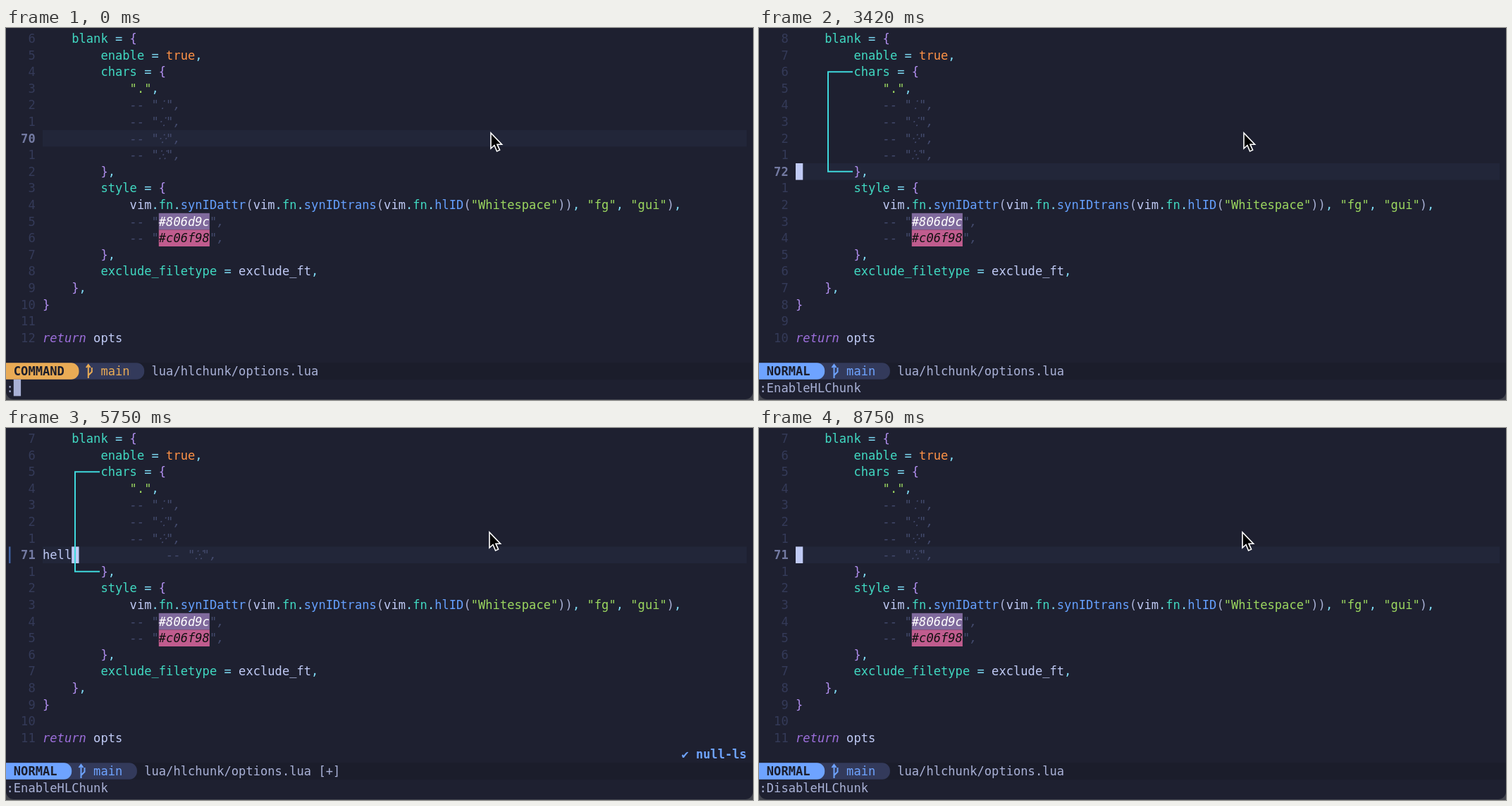
These frames come from a looping animation (1060 px wide and 528 px high, 8790 ms). An HTML page with a canvas:

```html
<!DOCTYPE html>
<html lang="en">
<head>
<meta charset="utf-8">
<title>Editor session</title>
<style>
  html, body { margin: 0; overflow: hidden; background: #1e2030; }
  canvas { display: block; }
</style>
</head>
<body>
<canvas id="stage" width="1060" height="528"></canvas>
<script>
const ctx = document.getElementById('stage').getContext('2d');
const LOOP = 8790, CELL = 10.3, LINE = 23.6, GUTTER = 5;
const FONT = '17.1px "DejaVu Sans Mono", "Noto Sans Mono", "Noto Sans CJK SC", "Noto Sans CJK", monospace';
const C = {
  bg: '#1e2030', line: '#222639', bar: '#1b1d2b', branch: '#333a5b', text: '#c0caf5', soft: '#a9b1d6',
  number: '#343a58', current: '#737aa2', comment: '#434a6d', key: '#41d9c2', punct: '#7fdcf5',
  brace: '#b28ff0', string: '#9bd65f', bool: '#ff9246', func: '#65a0ff', keyword: '#9d6fdc',
  chunk: '#3fd8dc', border: '#29a4bd', match: '#10bcd8', kind: '#b694f6', select: '#343a58'
};
const MODES = { NORMAL: '#6ea3ff', INSERT: '#8fd04f', COMMAND: '#e9ab55' };

const code = `    blank = {
        enable = true,
        chars = {
            ".",
            -- "⁚",
            -- "⁖",
            -- "⁘",
            -- "⁙",
        },
        style = {
            vim.fn.synIDattr(vim.fn.synIDtrans(vim.fn.hlID("Whitespace")), "fg", "gui"),
            -- "#806d9c",
            -- "#c06f98",
        },
        exclude_filetype = exclude_ft,
    },
}

return opts`.split('\n');

const rules = [
  [/^--.*/, C.comment, 'italic'], [/^"[^"]*"/, C.string], [/^true/, C.bool], [/^return/, C.keyword, 'italic'],
  [/^\w+(?= =)/, C.key], [/^fn(?=\.)/, C.key], [/^\w+(?=\()/, C.func], [/^\w+/, C.text],
  [/^[{}]/, C.brace], [/^[()]/, C.soft], [/^[=,.]/, C.punct], [/^\s+/, C.text]
];

const targets = ['HL', 'HLIndent', 'HLChunk', 'HLBlank', 'HLLineNum'];
const commands = [
  ...targets.map(s => 'Enable' + s),
  ...'earlier echo echoerr echohl echomsg echon edit else elseif emenu endif enew ex'.split(' '),
  ...targets.map(s => 'Disable' + s),
  ...'delete delmarks diffthis display doautocmd'.split(' ')
];

// Indices of the letters of a fuzzy match, or null
function fuzzy(word, query) {
  const hits = [];
  let from = 0;
  for (const ch of query) {
    const at = word.toLowerCase().indexOf(ch, from);
    if (at < 0 || (!hits.length && at)) return null;
    hits.push(at);
    from = at + 1;
  }
  return hits;
}

// Timeline of [time, state patch]
const events = [[-200, {
  mode: 'COMMAND', row: 6, col: 18, cmd: ':', query: '', pick: -1, chunk: false,
  typed: '', dirty: false, lsp: false, mouse: [688, 149]
}]];
const at = (time, patch) => events.push([time, patch]);

function runCommand(start, step, query, prefix, enter, chunk) {
  for (let i = 1; i <= query.length; i++) {
    const time = start + (i - 1) * step, part = query.slice(0, i);
    at(time, { cmd: ':' + part });
    at(time + 80, { query: part });
  }
  for (let i = 0; i < 3; i++) at(enter - 430 + i * 120, { pick: i, cmd: ':' + prefix + targets[i] });
  at(enter, { mode: 'NORMAL', query: '', pick: -1, chunk });
}

runCommand(180, 110, 'enablhl', 'Enable', 1550, true);
at(2100, { row: 7 });
at(2900, { row: 8, col: 9 });
at(3150, { col: 0 });
at(3800, { row: 7 });
at(4150, { mode: 'INSERT', mouse: [686, 148] });
[...'hello'].forEach((_, i) => at(4330 + i * 160, {
  typed: 'hello'.slice(0, i + 1), col: i + 1, dirty: true, lsp: true
}));
at(5500, { mode: 'NORMAL', col: 4 });
at(5850, { row: 8 });
at(6150, { row: 7 });
at(6620, { typed: '', dirty: false, col: 0, cmd: '1 行发生改变; before #279  3 秒前' });
at(7250, { mode: 'COMMAND', cmd: ':', lsp: false });
runCommand(7370, 85, 'disablhl', 'Disable', 8500, false);
events.sort((a, b) => a[0] - b[0]);

const X = col => 0.5 + col * CELL;
const Y = row => 15 + row * LINE;

function box(col, row, cells, color) {
  ctx.fillStyle = color;
  ctx.fillRect(X(col), Y(row) - LINE / 2, cells * CELL, LINE);
}

// Writes text on the character grid
function put(text, col, row, color, style = '') {
  ctx.font = style + ' ' + FONT;
  ctx.fillStyle = color;
  for (const ch of text) {
    ctx.fillText(ch, X(col), Y(row) + 6);
    col += ch > '\u2e80' ? 2 : 1;
  }
}

function putCode(text, row) {
  let col = GUTTER;
  while (text) {
    const [re, color, style] = rules.find(r => r[0].test(text));
    const token = text.match(re)[0];
    put(token, col, row, color, style);
    const hex = token.match(/#\w{6}/);
    if (hex) {
      const light = hex[0] === '#806d9c', left = col + hex.index;
      box(left, row, 7, light ? '#806a9d' : '#c05c8e');
      put(hex[0], left, row, light ? '#fff' : '#111', 'italic');
    }
    col += token.length;
    text = text.slice(token.length);
  }
}

function drawChunk() {
  ctx.strokeStyle = C.chunk;
  ctx.lineWidth = 2;
  ctx.beginPath();
  ctx.moveTo(133, Y(2));
  ctx.lineTo(98, Y(2));
  ctx.lineTo(98, Y(8));
  ctx.lineTo(133, Y(8));
  ctx.stroke();
}

function pill(cells, color) {
  ctx.fillStyle = color;
  ctx.beginPath();
  ctx.roundRect(0, Y(20) - LINE / 2, X(cells), LINE, [0, 11, 11, 0]);
  ctx.fill();
}

function drawStatus(s) {
  const color = MODES[s.mode], n = s.mode.length;
  ctx.fillStyle = C.bar;
  ctx.fillRect(0, Y(20) - LINE / 2, 1060, LINE);
  pill(n + 12, C.branch);
  pill(n + 3, color);
  put(s.mode, 1, 20, '#1b1d2b', 'bold');
  put('main', n + 6, 20, color);
  put('lua/hlchunk/options.lua' + (s.dirty ? ' [+]' : ''), n + 13, 20, C.soft);
  const x = X(n + 4), y = Y(20);
  ctx.strokeStyle = color;
  ctx.lineWidth = 2;
  ctx.stroke(new Path2D(`M${x + 3} ${y + 10}V${y - 9}M${x} ${y - 5}l3 -4l3 4M${x + 3} ${y + 6}l5 -5v-6`));
}

function drawMenu(s) {
  const items = commands.map(word => [word, fuzzy(word, s.query)]).filter(item => item[1]);
  const top = 19 - items.length;
  const icon = 3 + Math.max(...items.map(item => item[0].length));
  const right = icon + 21;
  ctx.fillStyle = C.bg;
  ctx.fillRect(0, Y(top) - LINE / 2, X(right + 1), (items.length + 2) * LINE);
  ctx.strokeStyle = C.border;
  ctx.lineWidth = 1.4;
  ctx.beginPath();
  ctx.roundRect(X(0.5), Y(top), (right) * CELL, Y(20) - Y(top), 5);
  ctx.stroke();
  items.forEach(([word, hits], i) => {
    const row = top + 1 + i, x = X(icon), y = Y(row);
    if (i === s.pick) box(1, row, right - 1, C.select);
    [...word].forEach((ch, k) => put(ch, 2 + k, row, hits.includes(k) ? C.match : C.text));
    ctx.fillStyle = C.kind;
    for (const [dx, dy, r] of [[4, -2, 4.2], [10.5, 4, 2.8], [12, -4, 1.8]]) {
      ctx.beginPath();
      ctx.arc(x + dx, y + dy, r, 0, 7);
      ctx.fill();
    }
    put('Variable', icon + 2, row, C.kind);
    put('<CMDLINE>', icon + 11, row, C.comment);
  });
}

function drawMouse([x, y]) {
  const arrow = new Path2D(`M${x} ${y}v22l5 -4.5l3.6 8.5l4 -1.8l-3.6 -8h6.6z`);
  ctx.fillStyle = '#000';
  ctx.strokeStyle = '#fff';
  ctx.lineWidth = 1.6;
  ctx.fill(arrow);
  ctx.stroke(arrow);
}

function draw(t) {
  const past = events.filter(e => e[0] <= t);
  const s = Object.assign({}, ...past.map(e => e[1]));
  const age = t - past[past.length - 1][0];

  ctx.fillStyle = '#44464f';
  ctx.fillRect(0, 0, 1060, 528);
  ctx.fillStyle = C.bg;
  ctx.beginPath();
  ctx.roundRect(0, -20, 1060, 547, 11);
  ctx.fill();
  box(GUTTER, s.row, 97, C.line);

  code.forEach((text, i) => {
    const here = i === s.row;
    const number = String(here ? 64 + i : Math.abs(i - s.row));
    put(number, 4 - number.length, i, here ? C.current : C.number, here ? 'bold' : '');
    putCode(i === 7 ? s.typed + text : text, i);
  });

  const cursor = GUTTER + s.col;
  if (s.mode === 'NORMAL') {
    ctx.globalAlpha = Math.min(1, age / 80);
    box(cursor, s.row, 1, C.text);
    ctx.globalAlpha = 1;
  } else if (s.mode === 'INSERT') {
    box(cursor, s.row, 0.2, C.punct);
  }
  if (s.dirty) {
    ctx.fillStyle = '#3f619f';
    ctx.fillRect(4, Y(7) - LINE / 2, 2.5, LINE);
  }
  if (s.chunk) drawChunk();
  if (s.lsp) put('✔ null-ls', 93, 19, MODES.NORMAL, 'bold');

  drawStatus(s);
  put(s.cmd, 0, 21, C.soft);
  if (s.query) drawMenu(s);
  else if (s.mode === 'COMMAND') box(s.cmd.length, 21, 1, C.soft);
  drawMouse(s.mouse);
}

function tick() {
  draw(performance.now() % LOOP);
  requestAnimationFrame(tick);
}
tick();
</script>
</body>
</html>
```
